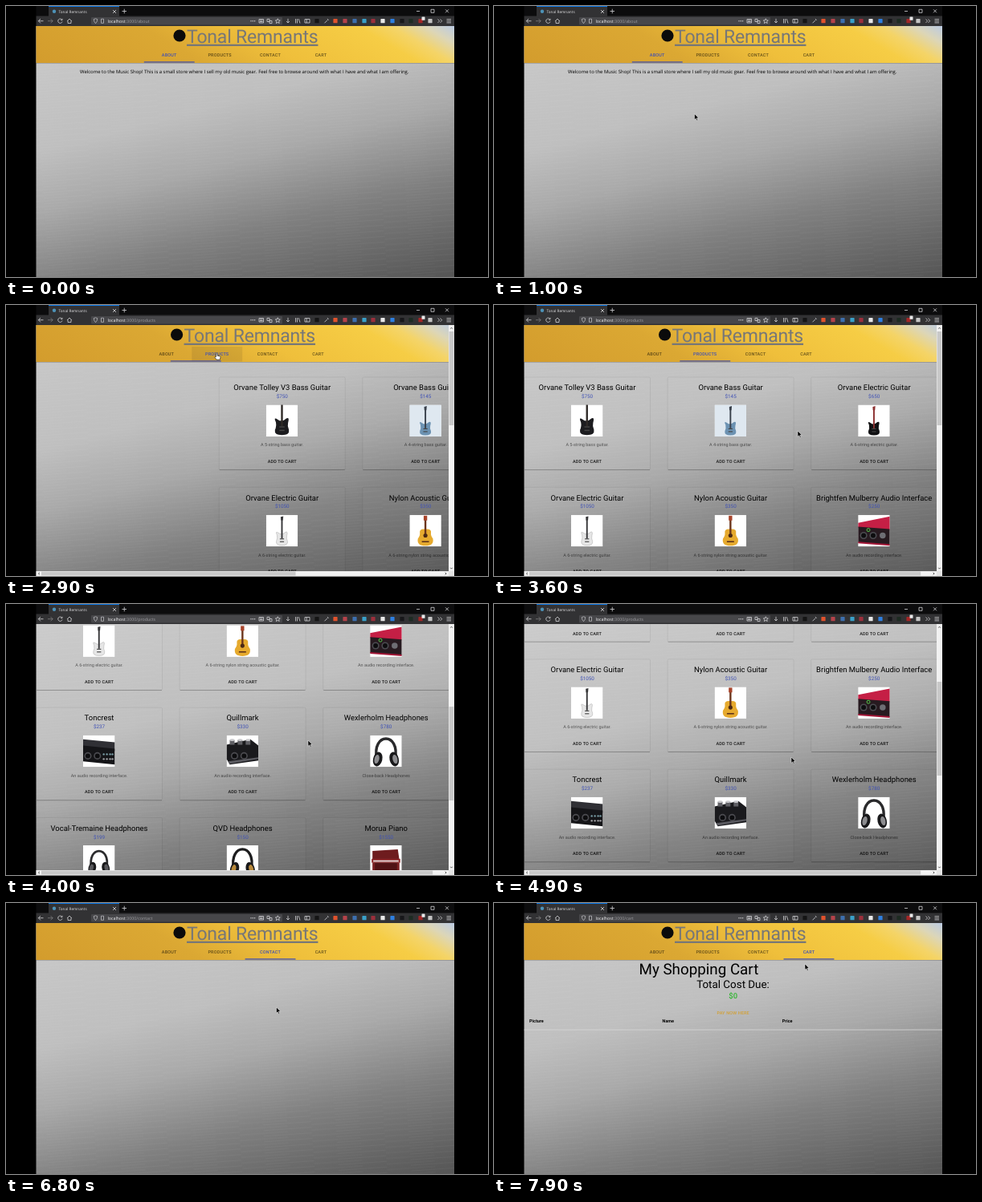
An HTML page for the animation above (8000 ms loop, 600 by 338 pixels).

```html
<!DOCTYPE html>
<html lang="en">
<head>
<meta charset="utf-8">
<title>Tonal Remnants</title>
<style>
  html, body { margin: 0; width: 100%; height: 100%; overflow: hidden; background: #000; }
  svg { display: block; }
  #stage { width: 600px; height: 338px; }
  text { font-family: Roboto, sans-serif; text-rendering: geometricPrecision; }
  .ui { font-family: "Open Sans", "Noto Sans", sans-serif; }
  .mid { text-anchor: middle; }
  .btn { font-size: 5.5px; font-weight: 500; letter-spacing: .157px; text-anchor: middle; }
  .soft { fill: #000; fill-opacity: .56; }
  .line { fill: none; stroke: #d4d4d6; stroke-width: .8; }
</style>
</head>
<body>
<svg id="stage" viewBox="0 0 600 338">
  <defs>
    <linearGradient id="steel" gradientUnits="userSpaceOnUse" x1="241" y1="-30" x2="354" y2="393">
      <stop offset="0" stop-color="#cacaca"/><stop offset=".35" stop-color="#bfbfbf"/>
      <stop offset=".52" stop-color="#a9a9a9"/><stop offset=".72" stop-color="#808080"/>
      <stop offset="1" stop-color="#555"/>
    </linearGradient>
    <linearGradient id="gold" gradientUnits="userSpaceOnUse" x1="37" y1="71" x2="191.5" y2="-190.7">
      <stop offset="0" stop-color="#d39c2d"/><stop offset=".35" stop-color="#dba833"/>
      <stop offset=".55" stop-color="#efbf3b"/><stop offset=".8" stop-color="#f6cd45"/>
      <stop offset=".87" stop-color="#f4d468"/><stop offset=".94" stop-color="#dcd6b8"/>
      <stop offset="1" stop-color="#bccbe2"/>
    </linearGradient>
    <pattern id="brush" width="90" height="7" patternUnits="userSpaceOnUse" patternTransform="rotate(-4)">
      <path d="M0 1H60M30 4.5H90" stroke="#fff" stroke-opacity=".05" stroke-width=".8"/>
    </pattern>
    <clipPath id="view"><path d="M37.5 25H558V338H37.5Z"/></clipPath>
  </defs>
  <rect width="600" height="338"/>
  <g id="chrome"></g>
  <g clip-path="url(#view)">
    <path d="M37 25H558V338H37Z" fill="url(#steel)"/>
    <path d="M37 25H558V338H37Z" fill="url(#brush)"/>
    <g id="page">
      <g id="content"></g>
      <g id="header"></g>
    </g>
    <g id="bars"></g>
  </g>
  <g id="cursor">
    <path id="arrow" d="M0 0V7.4L1.8 5.8L3 8.4L4.2 7.9L3 5.3H5.3Z" stroke="#fff" stroke-width=".5"/>
    <path id="hand" d="M0 .6Q.9 -.5 1.6 .6V3.2L4.9 4Q5.6 4.3 5.4 5.4L4.8 8.2H.6L-1.8 5Q-1.6 3.9 0 4.8Z"
      fill="#fff" stroke="#111" stroke-width=".6"/>
  </g>
</svg>
<script>
const $ = id => document.getElementById(id);
const LOOP = 8000, STEP = 100;
const SHOP = 'Tonal Remnants';

const text = (x, y, size, str, extra = '') =>
  `<text x="${x}" y="${y}" font-size="${size}" ${extra}>${str}</text>`;
const rect = (x, y, w, h, fill, extra = '') =>
  `<rect x="${x}" y="${y}" width="${w}" height="${h}" fill="${fill}" ${extra}/>`;
const dot = (x, y, r, fill, extra = '') =>
  `<circle cx="${x}" cy="${y}" r="${r}" fill="${fill}" ${extra}/>`;
const path = (d, fill, extra = '') => `<path d="${d}" fill="${fill}" ${extra}/>`;

// Browser window
const badges = [
  [387, '#151515'], [410, '#e0522d'], [422, '#b5434a'], [434, '#3d6fae'], [446, '#3aa0c8'],
  [457, '#9c2f3c'], [469, '#e8e8e8'], [481, '#2e7fe0'], [493, '#17171a'], [504, '#1d2b22'],
  [516, '#a32626'], [528, '#c4c4c4']
];
$('chrome').innerHTML =
  rect(37.5, 0, 520.5, 13, '#0c0c0d') +
  rect(37.5, 12.5, 520.5, 12.5, '#323234') +
  rect(53, 0, 88, 13, '#323234') + rect(53, 0, 88, .9, '#0a84ff') +
  dot(60, 6.8, 2.2, '#4d93b8') +
  text(65.5, 8.7, 4.7, SHOP, 'class="ui" fill="#e4e4e6"') +
  `<path class="line" d="M133 5L137 9M137 5L133 9M144.500 6.500H150M147.250 3.700V9.300
    M511 6.500H515M529 4.300H533V8.300H529ZM547 4.300L551 8.300M551 4.300L547 8.300"/>` +
  `<path class="line" d="M46.500 18.700H40.500M43 16L40.300 18.700L43 21.400M69.500 17A2.700 2.700 0 1 0 70 19.500
    M70 15.800V17.600H68.200M76 19L79 16L82 19M77 18.500V21.500H81V18.500"/>` +
  `<path class="line" stroke-opacity=".45" d="M52 18.700H58M55.500 16L58.200 18.700L55.500 21.400"/>` +
  rect(106, 14, 238, 9.6, '#47474a', 'rx="1"') +
  `<path class="line" stroke-opacity=".8" d="M109.300 16.500L111.500 15.800L113.700 16.500Q113.600 20 111.500 21.700Q109.400 20 109.300 16.500Z
    M118.500 16.200H121.500V21.300H118.500Z"/>` +
  `<text class="ui" x="126.500" y="20.800" font-size="5.300" fill="#f4f4f5">localhost<tspan id="url" fill="#9b9b9f"></tspan></text>` +
  [305, 307.3, 309.6].map(x => dot(x, 18.7, .7, '#d4d4d6')).join('') +
  `<path class="line" d="M315 16.500H320.500V21H315ZM316 18H319.500M316 19.500H319.500M325 16.300H328V19.500H325ZM328 18.500H331V21.600H328Z
    M338.300 15.800L339.200 17.800L341.300 18L339.700 19.400L340.200 21.500L338.300 20.400L336.400 21.500L336.900 19.400L335.300 18L337.400 17.800Z
    M351 15.800V21M349 19L351 21L353 19M360.500 16V21.500M362.500 16V21.500M364.200 16L366 21.500M372 16.500H378V21H372ZM374.300 16.500V21
    M396.500 21.300L400 17.800M400 16L401.500 18M537.500 16.500L539.700 18.700L537.500 20.900M540.500 16.500L542.700 18.700L540.500 20.900
    M548.500 16.700H554M548.500 18.800H554M548.500 20.900H554"/>` +
  badges.map(([x, c]) => rect(x - 2.6, 16.1, 5.2, 5.2, c, 'rx=".600"')).join('') +
  rect(517.5, 13.6, 4, 4.2, '#e9e9ea', 'rx=".500"');

// Product pictures, each on a 40 x 40 tile
const guitar = (body, neck, y, size, rim = 'none') =>
  `<g transform="translate(20 ${y}) scale(${size})">` +
  path('M-7 -3Q-10 -9 -5 -6Q0 -2 5 -7Q9 -9 7 -2Q6 2 8 6Q9 12 0 12Q-9 12 -8 6Q-6 2 -7 -3Z', body, `stroke="${rim}" stroke-width=".600"`) +
  rect(-1.1, -25, 2.2, 27, neck) + path('M-1.800 -29L2 -30L1.500 -24H-1.500Z', neck) +
  rect(-3, 2, 6, 1.3, '#444') + rect(-3, 6, 6, 1.3, '#444') + '</g>';
const acoustic = () =>
  path('M20 18Q28 17 27 23Q26.500 26 29.500 30Q31 39 20 39Q9 39 10.500 30Q13.500 26 13 23Q12 17 20 18Z', '#e6aa2e') +
  rect(18.8, 2, 2.4, 22, '#6b351b') + rect(17.8, 1, 4.4, 6, '#a8432a') +
  dot(20, 26, 2.6, '#4a2814') + rect(15.5, 33, 9, 1.6, '#5e3219');
const jacks = xs => xs.map(x => dot(x, 26, 4.6, '#4b4b50') + dot(x, 26, 3, '#0d0d0f')).join('');
const redUnit = () =>
  path('M0 10L40 2V19L0 16Z', '#c51f45') + path('M0 15L40 18V38L0 35Z', '#271a20') +
  jacks([7, 19]) + dot(13, 19, 2, 'none', 'stroke="#55c948"') + dot(31, 26, 3.8, '#6e6e74') + path('M0 34L40 37V39L0 36Z', '#a31637');
const blackUnit = () =>
  path('M0 5L40 9V20L0 14Z', '#303035') + path('M0 13L40 17V37L0 33Z', '#151518') +
  jacks([6, 18]) + [26, 30, 34, 37].map(x => dot(x, 24, 1.2, '#7ba0a8') + dot(x, 30, 1.2, '#a5a5a8')).join('');
const knobUnit = () =>
  path('M0 12L30 5L40 13V32L4 37L0 30Z', '#1a1a1d') + jacks([10, 22]) +
  [7, 17, 27].map(x => rect(x - 3, 6, 6, 6, '#606065') + `<ellipse cx="${x}" cy="6" rx="3" ry="1.500" fill="#c9c9cc"/>`).join('') +
  path('M2 33L40 28V30L4 36Z', '#5a5a60');
const phones = (band, cup, size) =>
  `<g transform="translate(20 21) scale(${size})"><path d="M-10 8C-16 -22 16 -22 10 8" fill="none" stroke="${band}" stroke-width="3"/>` +
  [-1, 1].map(s => `<ellipse cx="${9 * s}" cy="8" rx="5" ry="8" fill="#19191b" transform="rotate(${-14 * s} ${9 * s} 8)"/>` +
    `<ellipse cx="${10 * s}" cy="8" rx="2.600" ry="5" fill="${cup}" transform="rotate(${-14 * s} ${10 * s} 8)"/>`).join('') + '</g>';
const piano = () =>
  path('M3 7L35 5L37 19H3Z', '#6e1c1e') + rect(2, 17, 36, 5, '#8a2527') + rect(4, 19, 32, 1.6, '#eee') +
  rect(5, 22, 30, 12, '#501315') + rect(3, 22, 3, 15, '#7a2022') + rect(34, 22, 3, 15, '#7a2022');

const products = [
  ['Orvane Tolley V3 Bass Guitar', 750, 'A 5-string bass guitar.', guitar('#1c1c1f', '#2f2a27', 25, 1.1)],
  ['Orvane Bass Guitar', 145, 'A 4-string bass guitar.', rect(0, 0, 40, 40, '#dfe8f0') + guitar('#6c92b2', '#39404b', 28, .88)],
  ['Orvane Electric Guitar', 650, 'A 6-string electric guitar.', guitar('#121214', '#8c3030', 28, .88)],
  ['Orvane Electric Guitar', 1050, 'A 6-string electric guitar.', guitar('#e6e6e6', '#38383a', 28, .88, '#aaa')],
  ['Nylon Acoustic Guitar', 350, 'A 6-string nylon string acoustic guitar.', acoustic()],
  ['Brightfen Mulberry Audio Interface', 250, 'An audio recording interface.', redUnit()],
  ['Toncrest', 237, 'An audio recording interface.', blackUnit()],
  ['Quillmark', 330, 'An audio recording interface.', knobUnit()],
  ['Wexlerholm Headphones', 780, 'Close-back Headphones', phones('#2a2a2c', '#8d8d90', 1.15)],
  ['Vocal-Tremaine Headphones', 199, 'Close-back Headphones', phones('#2c2c2e', '#57575b', .95)],
  ['QVD Headphones', 150, 'Close-back Headphones', phones('#1d1d1e', '#b98a3c', 1.1)],
  ['Morua Piano', 1550, 'An upright piano.', piano()]
];

const card = ([name, price, note, art], i) => {
  const x = 116 + i % 3 * 178.6, y = Math.floor(i / 3) * 137.3;
  return `<g transform="translate(${x} ${y})">` +
    rect(-78.5, 90, 157, 115.5, '#fff', 'fill-opacity=".020" stroke="#000" stroke-opacity=".090" stroke-width=".700" rx="1.500"') +
    path('M-78 205.600H78', 'none', 'stroke="#000" stroke-opacity=".280" stroke-width=".800"') +
    text(0, 106.3, 9.45, name, 'class="mid"') +
    text(0, 116.1, 6.3, '$' + price, 'class="mid" fill="#3f51b5"') +
    `<svg x="-20" y="124.500" width="39.500" height="39.500" viewBox="0 0 40 40">${rect(0, 0, 40, 40, '#fff')}${art}</svg>` +
    text(0, 176.4, 5.5, note, 'class="mid soft"') +
    text(0, 197.1, 5.5, 'ADD TO CART', 'class="btn" fill-opacity=".870"') + '</g>';
};

const views = {
  about: text(92, 83.9, 5.965, 'Welcome to the Music Shop! This is a small store where I sell my old music gear. Feel free to browse around with what I have and what I am offering.', 'class="ui"'),
  products: products.map(card).join(''),
  contact: '',
  cart:
    text(180.5, 88.6, 18.8, 'My Shopping Cart') +
    text(297.5, 105.6, 13.4, 'Total Cost Due:', 'class="mid"') +
    text(297.7, 118.9, 9.45, '$0', 'class="mid" fill="#2fb52f" font-weight="500"') +
    text(297.7, 139, 5.5, 'PAY NOW HERE', 'class="btn" fill="#d3a033"') +
    [[44, 'Picture'], [209.5, 'Name'], [358.7, 'Price']].map(([x, s]) => text(x, 148.9, 5.5, s, 'font-weight="700"')).join('') +
    rect(37, 157.7, 521, .8, '#d8d8d8')
};
const names = Object.keys(views);
$('content').innerHTML = names.map(n => `<g id="${n}">${views[n]}</g>`).join('');

// Site header
const tabX = n => 203.2 + names.indexOf(n) * 62.9;
$('header').innerHTML =
  rect(37, 70.5, 521, 1.3, '#000', 'fill-opacity=".220"') + rect(37, 25, 521, 46, 'url(#gold)') +
  '<g id="nav">' + dot(216, 37, 7.6, '#0b0b0b') +
  text(225, 45.7, 23, SHOP, 'fill="#777" letter-spacing="-.190" text-decoration="underline"') +
  '<svg id="ripple" y="52" width="62.900" height="18.500"><circle cx="27.500" cy="10" fill="#2e2a20"/></svg>' +
  names.map(n => text(tabX(n), 63, 5.5, n.toUpperCase(), `id="tab-${n}" class="btn"`)).join('') +
  '<rect id="mark" y="69.300" width="62.900" height="1.300" fill="#3f51b5"/></g>';

// Scrollbars
const arrow = (x, y, turn) =>
  `<path d="M-1.200 .8L0 -.6L1.200 .8" fill="none" stroke="#444" stroke-width=".9" transform="translate(${x} ${y}) rotate(${turn})"/>`;
$('bars').innerHTML =
  '<g id="across">' + rect(37, 332, 521, 6, '#f1f1f1') + rect(44, 332.6, 0, 4.8, '#c8c8c8', 'id="thumbX"') +
  arrow(41, 335, -90) + `<g id="endX">${arrow(0, 335, 90)}</g></g>` +
  '<g id="down">' + rect(551, 25, 7, 307, '#f1f1f1') + rect(551.6, 33, 5.8, 117, '#c8c8c8', 'id="thumbY"') +
  arrow(554.5, 28.8, 0) + arrow(554.5, 328.5, 180) + rect(551, 332, 7, 6, '#e4e4e4') + '</g>';

// Timeline: clicks, pointer path, page scroll
const visits = [[-2000, 'about'], [1700, 'about'], [2700, 'products'], [5700, 'contact'], [7200, 'cart']];
const pointer = [
  [500, 300, 210], [1500, 199, 59], [2200, 199, 59], [2600, 260, 60], [3000, 262, 60], [3600, 378, 157],
  [4000, 376, 170], [4900, 370, 191], [5300, 366, 186], [5600, 320, 60], [5900, 320, 60],
  [6500, 285, 200], [7100, 388, 60], [7500, 388, 60], [7900, 387, 76]
];
const scrolling = [[3700, 0], [4000, 235.4], [4200, 300], [4600, 300], [4900, 158.4], [5300, 0]];

const at = (keys, t, col = 1) => {
  const i = keys.findIndex(k => k[0] > t);
  if (i === 0) return keys[0][col];
  if (i < 0) return keys[keys.length - 1][col];
  const a = keys[i - 1], b = keys[i];
  return a[col] + (b[col] - a[col]) * (t - a[0]) / (b[0] - a[0]);
};
const set = (id, attrs) => { for (const k in attrs) $(id).setAttribute(k, attrs[k]); };
const show = (id, on) => { $(id).style.display = on ? '' : 'none'; };
const move = (id, x, y) => set(id, { transform: `translate(${x} ${y})` });

function draw(t) {
  const clicked = visits.filter(v => v[0] <= t).pop();
  const opened = visits.filter(v => v[0] + STEP <= t);
  const [start, view] = opened.pop();
  const before = opened.length ? opened.pop()[1] : view;
  const left = 1 - Math.min(1, (t - start - STEP) / 400);
  const slide = 520 * left ** 2.87;
  const tall = view === 'products';
  const scroll = at(scrolling, t);

  $('url').textContent = ':3000/' + clicked[1];
  names.forEach(n => {
    show(n, n === view);
    set('tab-' + n, { fill: n === view ? '#3f51b5' : '#000', 'fill-opacity': n === view ? 1 : .56 });
  });
  move('page', 0, -scroll);
  move('content', slide, 0);
  move('nav', tall ? -3.4 : 0, 0);
  set('mark', { x: tabX(view) - 31.4 + (tabX(before) - tabX(view)) * left ** 3 });

  const age = t - clicked[0];
  show('ripple', age < 400);
  set('ripple', { x: tabX(clicked[1]) - 31.4 });
  const ring = $('ripple').firstChild;
  ring.setAttribute('r', 34 + age * .1);
  ring.setAttribute('fill-opacity', .3 * Math.max(0, 1 - age / 400) ** 1.5);

  const width = tall ? 513 : 520, track = width - 13.5;
  show('across', tall || slide > 0);
  show('down', tall);
  set('thumbX', { width: track * width / (width + (tall ? 13 : 0) + slide * 1.245) });
  move('endX', tall ? 547.5 : 554.5, 0);
  set('thumbY', { y: 33 + scroll * .404 });

  const x = at(pointer, t), y = at(pointer, t, 2);
  const onTab = scroll === 0 && y > 51 && y < 70 && x > 170 && x < 423;
  show('cursor', t >= pointer[0][0]);
  show('hand', onTab);
  show('arrow', !onTab);
  move('cursor', x, y);
}

const began = performance.now();
function tick() {
  const t = (performance.now() - began) % LOOP;
  draw(Math.floor(t / STEP) * STEP);
  requestAnimationFrame(tick);
}
tick();
</script>
</body>
</html>
```
